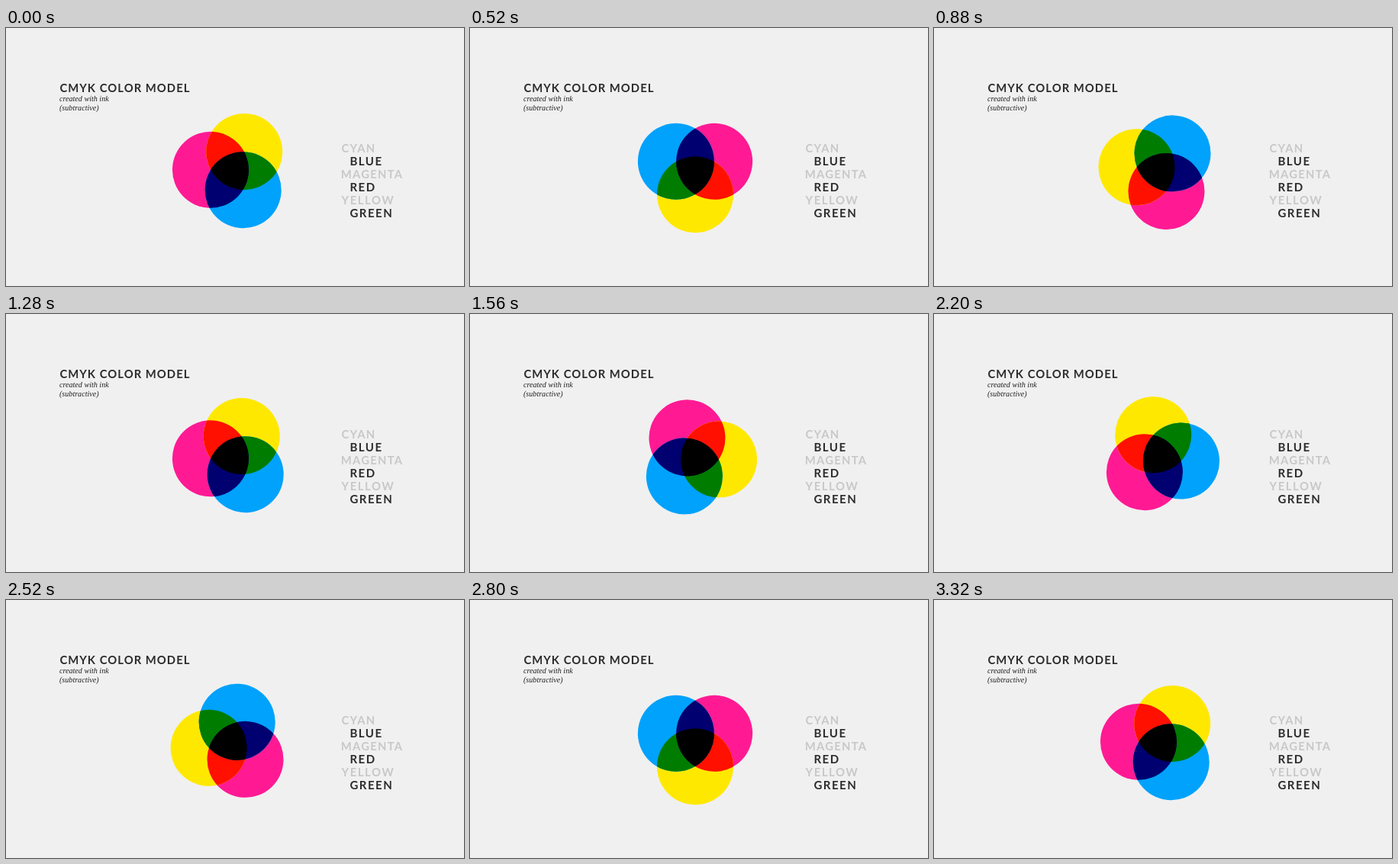
An HTML page for the animation above (3360 ms loop, 600 by 338 pixels).

```html
<!DOCTYPE html>
<html lang="en">
<head>
<meta charset="utf-8">
<title>CMYK color model</title>
<style>
  html, body { margin: 0; width: 100%; height: 100%; overflow: hidden; background: #f0f0f0; }
  svg { display: block; width: 600px; height: 338px; }
  .caps { font: 700 14.8px Lato, sans-serif; letter-spacing: 1.04px; fill: #2c2c2c; }
  .ink { fill: #c8c8c8; letter-spacing: 1.25px; }
  .mix { font-size: 15px; letter-spacing: 1.5px; }
  .note { font: italic 10.1px "Liberation Serif", serif; fill: #222; }
  .soft { filter: blur(0.45px); }
</style>
</head>
<body>
<svg viewBox="0 0 600 338">
  <defs>
    <circle id="m" cx="27.7" cy="1.1" r="50"/>
    <circle id="y" cx="-15.8" cy="26.2" r="50"/>
    <circle id="c" cx="-15.8" cy="-24.1" r="50"/>
    <clipPath id="inM"><use href="#m"/></clipPath>
    <clipPath id="inY"><use href="#y"/></clipPath>
    <clipPath id="inC"><use href="#c"/></clipPath>
  </defs>

  <text class="caps" x="70.4" y="83.5">CMYK COLOR MODEL</text>
  <text class="note" x="70" y="96">created with ink</text>
  <text class="note" x="70" y="108">(subtractive)</text>

  <g class="caps">
    <text class="ink" x="439.5" y="163">CYAN</text>
    <text class="mix" x="450.4" y="179.5">BLUE</text>
    <text class="ink" x="438.8" y="197">MAGENTA</text>
    <text class="mix" x="450.4" y="214">RED</text>
    <text class="ink" x="439.5" y="230.5" style="letter-spacing:1.6px">YELLOW</text>
    <text class="mix" x="450.4" y="248">GREEN</text>
  </g>

  <g class="soft">
    <g id="discs">
      <use href="#m" fill="#ff1a94"/>
      <use href="#y" fill="#ffe800"/>
      <use href="#c" fill="#00a2fc"/>
      <use href="#m" fill="#ff1000" clip-path="url(#inY)"/>
      <use href="#y" fill="#007c00" clip-path="url(#inC)"/>
      <use href="#c" fill="#000070" clip-path="url(#inM)"/>
      <g clip-path="url(#inM)"><use href="#y" clip-path="url(#inC)"/></g>
    </g>
  </g>
</svg>
<script>
  const discs = document.getElementById('discs');
  const STEP = 40, COUNT = 84;
  const start = performance.now();

  // Turn in degrees after k steps, slowing gently.
  const turn = k => 181.7 + k * (11.56 - k * (0.0082 + 0.00027 * k));

  function draw(now) {
    const n = Math.floor(Math.max(0, now - start) / STEP) % COUNT;
    const k = Math.min(n, COUNT - 1 - n); // forth, then back
    discs.setAttribute('transform', `translate(295.6 187.7) rotate(${turn(k)})`);
  }

  function loop() {
    draw(performance.now());
    requestAnimationFrame(loop);
  }
  loop();
</script>
</body>
</html>
```
